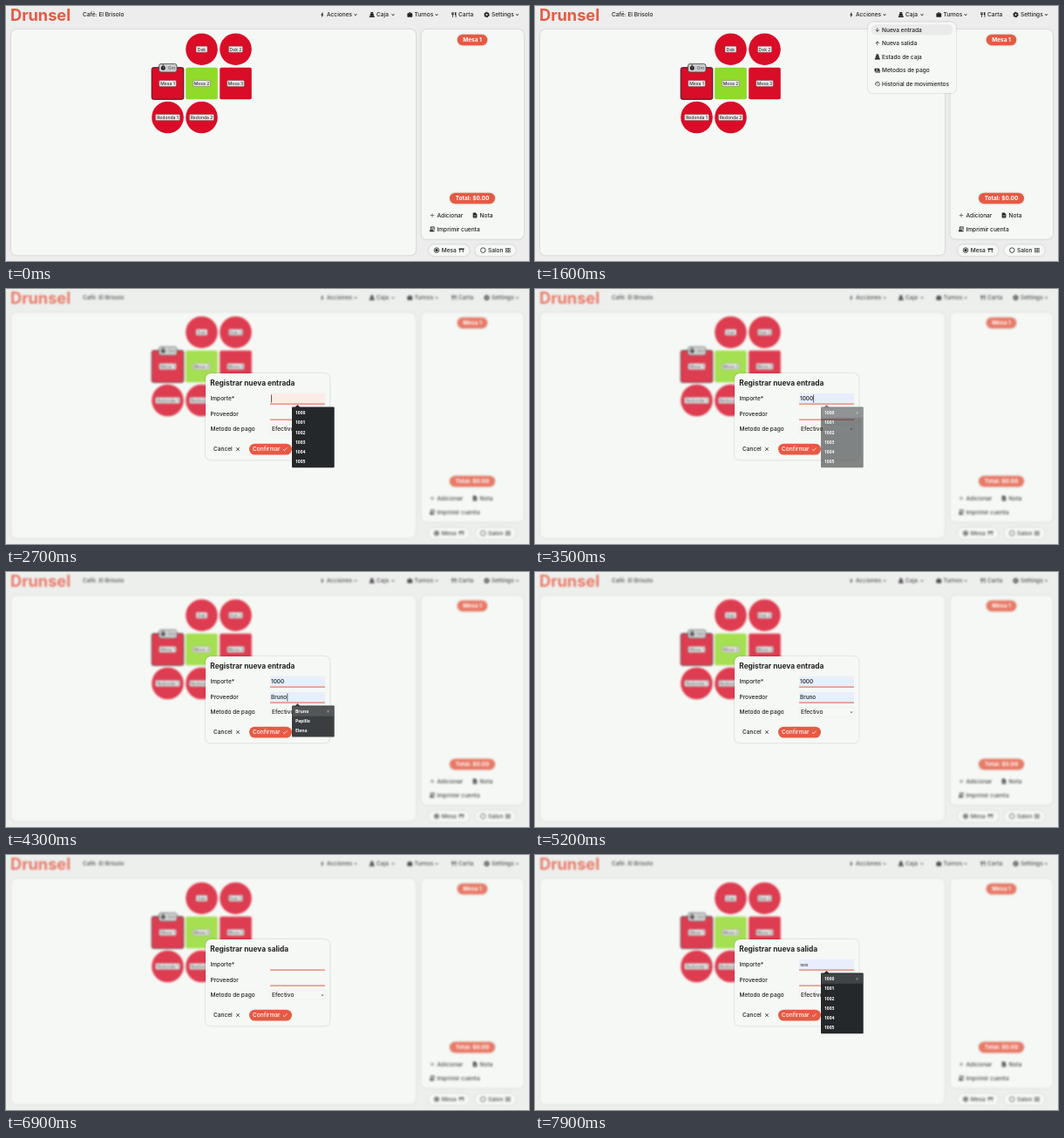
Write an HTML page that moves like this. It is 600 px wide and 293 px high and loops after 8000 ms.

```html
<!DOCTYPE html>
<html lang="es">
<head>
<meta charset="utf-8">
<title>Mesas</title>
<style>
html, body { margin: 0; width: 100%; height: 100%; overflow: hidden; background: #ecedec; }
svg { display: block; width: 100vw; height: 100vh; }
text { font-family: Inter, "Open Sans", sans-serif; font-weight: 500; white-space: pre; }
.list text { font-family: "Open Sans", "Noto Sans", sans-serif; font-weight: 700; }
.card { filter: drop-shadow(0 .5px 1px #0003); }
path { fill-rule: evenodd; }
</style>
</head>
<body>
<svg viewBox="0 0 600 293">
  <g id="page"></g>
  <rect id="veil" width="600" height="293" fill="#f6f8f6"/>
  <g id="over"></g>
</svg>
<script>
const INK = '#222', ORANGE = '#e65a44', RED = '#d90d27', PAPER = '#f5f8f4';
const $ = id => document.getElementById(id);

const ICONS = {
  bolt: 'M11 22h-1l1-8H7c-.6 0-.5-.3-.4-.5L13 2h1l-1 8h4c.5 0 .6.3.4.5z',
  chevron: 'M17 8 12 13 7 8 5 10l7 7 7-7z',
  register: 'M7 2h10v5H7z M6 8h12l2 8H4z M2 17h20v5H2z',
  bag: 'M10 2h4l2 2v2h4a2 2 0 0 1 2 2v11a2 2 0 0 1-2 2H4a2 2 0 0 1-2-2V8a2 2 0 0 1 2-2h4V4z M10 4v2h4V4z',
  fork: 'M11 9H9V2H7v7H5V2H3v7c0 2 1.7 3.8 3.8 4v9h2.4v-9c2-.2 3.8-2 3.8-4V2h-2z M16 6v8h2.5v8H21V2c-2.8 0-5 2-5 4z',
  table: 'M1 4h22v6H1z M4 10h3v11H4z M17 10h3v11h-3z',
  grid: 'M2 2h9v9H2z M4 4v5h5V4z M13 2h9v9h-9z M15 4v5h5V4z M2 13h9v9H2z M4 15v5h5v-5z M13 13h9v9h-9z M15 15v5h5v-5z',
  plus: 'M20 13h-7v7h-2v-7H4v-2h7V4h2v7h7z',
  note: 'M14 2H6a2 2 0 0 0-2 2v16a2 2 0 0 0 2 2h12a2 2 0 0 0 2-2V8z M8 12h8v2H8z M8 16h8v2H8z',
  receipt: 'M5 2h16v13h-3V5H8v9H5z M10 7h6v2h-6z M10 11h6v2h-6z M2 15h14v4h5v3H2z',
  down: 'M20 12l-1.4-1.4L13 16.2V4h-2v12.2L5.4 10.6 4 12l8 8z',
  up: 'M4 12l1.4 1.4L11 7.8V20h2V7.8l5.6 5.6L20 12 12 4z',
  cash: 'M1 4h18v12H1z M10 7a3 3 0 1 0 .01 0z M21 7h2v13H4v-2h17z',
  history: 'M13 3a9 9 0 0 0-9 9H1l3.9 3.9L9 12H6a7 7 0 1 1 2 5l-1.4 1.4A9 9 0 1 0 13 3z M12 8v5l4.3 2.5.7-1.2-3.5-2.1V8z',
  watch: 'M9 0h6v3H9z M12 4a9 9 0 1 0 .01 0z M11 8h2v6h-2z',
  close: 'M19 6.4 17.6 5 12 10.6 6.4 5 5 6.4 10.6 12 5 17.6 6.4 19 12 13.4 17.6 19 19 17.6 13.4 12z',
  check: 'M9 16.2 4.8 12l-1.4 1.4L9 19 21 7l-1.4-1.4z'
};

// Icons and texts are placed by their vertical centre.
const icon = (name, x, y, size = 7, fill = INK) =>
  `<path d="${ICONS[name]}" fill="${fill}" transform="translate(${x - size / 2} ${y - size / 2}) scale(${size / 24})"/>`;
const text = (s, x, y, size = 6.55, fill = INK, more = '') =>
  `<text x="${x}" y="${y + size * .36}" font-size="${size}" fill="${fill}" ${more}>${s}</text>`;
const rect = (x, y, w, h, r, fill, more = '') =>
  `<rect x="${x}" y="${y}" width="${w}" height="${h}" rx="${r}" fill="${fill}" ${more}/>`;
const circle = (x, y, r, fill, more = '') =>
  `<circle cx="${x}" cy="${y}" r="${r}" fill="${fill}" ${more}/>`;
const card = (x, y, w, h, r) => rect(x, y, w, h, r, PAPER, 'class="card"');
const BOLD = 'style="font-weight:700"', MID = 'text-anchor="middle"';

function nav(name, label, x, chevronX) {
  return (name ? icon(name, x - 5.2, 10) : '') + text(label, x, 10) +
    (chevronX ? icon('chevron', chevronX, 10, 6) : '');
}

function gear(x, y) {
  return circle(x, y, 1.9, 'none', `stroke="${INK}" stroke-width="1.6"`) +
    circle(x, y, 2.8, 'none', `stroke="${INK}" stroke-width="1" stroke-dasharray="1.47"`);
}

function seat(label, x, y, w, round, fill = RED, active) {
  const shape = round ? circle(x, y, 18.3, fill)
    : rect(x - 18.3, y - 18.3, 36.6, 36.6, 2, fill, active ? 'stroke="#3c1524" stroke-width="1"' : '');
  return shape + rect(x - w / 2, y - 3.5, w, 7, 1, '#ebeaea', 'stroke="#555" stroke-width=".4"') +
    text(label, x, y, 5, '#333', MID);
}

function badge(label, x, y, w) {
  return rect(x - w / 2, y - 6.2, w, 12.4, 6.2, ORANGE, 'class="card"') +
    text(label, x, y, 6.5, '#fff', MID + BOLD);
}

function radio(label, x, on, name) {
  return card(x, 274.3, 46.5, 12.7, 6.3) +
    circle(x + 9, 280.6, 2.8, 'none', `stroke="${INK}" stroke-width=".8"`) +
    (on ? circle(x + 9, 280.6, 1.6, INK) : '') +
    text(label, x + 14.7, 280.6) + icon(name, x + 37.5, 280.6, 6.5);
}

$('page').innerHTML =
  text('Drunsel', 5, 10, 18.2, ORANGE, BOLD) + text('Café: El Brisolo', 88, 10) +
  nav('bolt', 'Acciones', 368, 401) + nav('register', 'Caja', 425, 444) +
  nav('bag', 'Turnos', 468.5, 494) + nav('fork', 'Carta', 519, 0) +
  gear(551.5, 10) + nav('', 'Settings', 557, 586.5) +
  card(6, 27, 464, 259.3, 6) + card(476.5, 27, 117.5, 240.7, 6) +
  seat('Dek', 224.5, 49.7, 13, true) + seat('Dek 2', 263.5, 49.7, 16, true) +
  seat('Mesa 1', 185.5, 89, 19.5, false, RED, true) +
  seat('Mesa 2', 224.5, 89, 19.5, false, '#90da28') + seat('Mesa 3', 263.5, 89, 19.5) +
  seat('Redonda 1', 185.5, 128, 28, true) + seat('Redonda 2', 224.5, 128, 28, true) +
  rect(175.5, 66.4, 20.5, 9.6, 2.5, '#c9cbcc', 'stroke="#444" stroke-width=".8"') +
  icon('watch', 180.3, 71, 6.8) + text('0m', 186, 71.3, 5.3, '#666') +
  badge('Mesa 1', 535, 39, 34.5) + badge('Total: $0.00', 535, 221, 52) +
  icon('plus', 489, 240.5) + text('Adicionar', 494.5, 240.5) +
  icon('note', 538, 240.5) + text('Nota', 543.5, 240.5) +
  icon('receipt', 489, 256.3) + text('Imprimir cuenta', 494.5, 256.3) +
  radio('Mesa', 485, true, 'table') + radio('Salon', 538.3, false, 'grid');

const MENU = [
  ['down', 'Nueva entrada'], ['up', 'Nueva salida'], ['register', 'Estado de caja'],
  ['cash', 'Metodos de pago'], ['history', 'Historial de movimientos']
];

function menu(alpha, hover, strength) {
  return `<g opacity="${alpha}">` + card(382, 18.5, 101, 81.5, 6) +
    rect(385.5, 21.3 + hover * 15.6, 94, 12, 6, '#e9eae9', `opacity="${strength}"`) +
    MENU.map(([name, label], i) => {
      const y = 27.3 + i * 15.6;
      return icon(name, 392.8, y) + text(label, 398, y);
    }).join('') + '</g>';
}

const AMOUNTS = [1000, 1001, 1002, 1003, 1004, 1005], NAMES = ['Bruno', 'Pepillo', 'Elena'];

function list(items, y, hover, alpha) {
  return `<g class="list" opacity="${alpha}"><path d="M331.5 ${y + .5}l3-3 3 3z" fill="#25282b"/>` +
    rect(328, y, 48.7, items.length * 11.25 + 2.3, 1, '#25282b') +
    items.map((item, i) => {
      const mid = y + 6.7 + i * 11.25;
      return (i === hover ? rect(328.6, mid - 5.6, 47.5, 11.2, 0, '#414447') + icon('close', 369.5, mid, 5, '#aaa') : '') +
        text(item, 332, mid, 5, '#fff');
    }).join('') + '</g>';
}

function field(y, { value, preview, focus, caret }) {
  const filled = value || preview;
  return (filled || focus ? rect(303, y - 6, 63, 12, 0, filled ? '#e8eefb' : '#fdebe7') : '') +
    rect(303, y + 5.6, 63, 1, 0, ORANGE) +
    (value ? text(value, 304, y, 6.4, INK, 'class="value"') : '') +
    (preview ? text(preview, 304, y + .8, 4, INK, 'font-style="italic"') : '') +
    (caret ? rect(304.2, y - 4.5, .7, 9, 0, INK, 'class="caret"') : '');
}

function dialog(kind, alpha, amount, payee) {
  return `<g opacity="${alpha}">` + card(229, 97, 142.3, 99.3, 6) +
    text('Registrar nueva ' + kind, 234.3, 108, 8.3, INK, BOLD) +
    text('Importe*', 234.5, 126) + text('Proveedor', 234.5, 144) + text('Metodo de pago', 234.5, 161) +
    `<g>${field(126, amount)}</g><g>${field(144, payee)}</g>` +
    rect(303, 155.8, 63, 10.4, 1, '#f7f9f6', 'stroke="#e3e6e3" stroke-width=".5"') +
    text('Efectivo', 305, 161) + icon('chevron', 363, 161, 4.5) +
    text('Cancel', 238, 184) + icon('close', 266, 184) +
    rect(279, 177.7, 49, 12.8, 6.4, ORANGE) + text('Confirmar', 283, 184, 6.55, '#fff') +
    icon('check', 320.3, 184, 7, '#fff') + '</g>';
}

// Screen updates come every 100 ms; a ramp reaches 1 on its last update.
const STEP = 100;
const ramp = (t, start, steps) => Math.max(0, Math.min(1, ((t - start) / STEP + 1) / steps));
const within = (t, a, b) => t >= a && t < b;
const fade = (t, start) => 1 - ramp(t, start, 3) ** 2;

function form(t) {
  const first = t < 5300;
  const [open, low, top] = first ? [2700, 2900, 3300] : [7300, 7500, 7900];
  const picked = first && t >= 3400, named = first && t >= 4300;
  const row = t >= top ? 0 : t >= low ? 4 : -1;
  const amount = {
    focus: within(t, open, first ? 3900 : 8000),
    value: picked ? '1000' : '',
    preview: !picked && row >= 0 ? AMOUNTS[row] : '',
    caret: within(t, open, low) || first && within(t, 3400, 3900)
  };
  const payee = {
    focus: first && t >= 3900,
    value: named ? NAMES[0] : '',
    preview: first && within(t, 4200, 4300) ? NAMES[0] : '',
    caret: first && (within(t, 3900, 4200) || within(t, 4300, 4800))
  };
  let html = dialog(first ? 'entrada' : 'salida', ramp(t, first ? 1900 : 6700, 3), amount, payee);
  if (t >= open && (!first || t < 3600)) html += list(AMOUNTS, 135.5, row, first ? fade(t, 3400) : 1);
  if (first && within(t, 3900, 4500)) html += list(NAMES, 153.4, t >= 4200 ? 0 : -1, fade(t, 4300));
  return html;
}

function render(t) {
  const modal = within(t, 1900, 5300) || t >= 6700;
  const depth = modal ? ramp(t, t < 5300 ? 1900 : 6700, 3) : 0;
  $('page').style.filter = depth ? `blur(${depth * .9}px)` : 'none';
  $('veil').setAttribute('opacity', depth * .2);
  let html = '';
  if (modal) html = form(t);
  else if (within(t, 1100, 1900)) html = menu(ramp(t, 1100, 2), 0, ramp(t, 1500, 2));
  else if (t >= 5800) html = menu(ramp(t, 5800, 2), t < 6200 ? 0 : 1, t < 6200 ? 1 : ramp(t, 6200, 2));
  $('over').innerHTML = html;
  document.querySelectorAll('.value + .caret').forEach(c =>
    c.setAttribute('x', 304.3 + c.previousSibling.getComputedTextLength()));
}

let shown = -1;
const start = performance.now();
function tick() {
  const t = Math.floor((performance.now() - start) % 8000 / STEP) * STEP;
  if (t !== shown) render(shown = t);
  requestAnimationFrame(tick);
}
tick();
</script>
</body>
</html>
```
